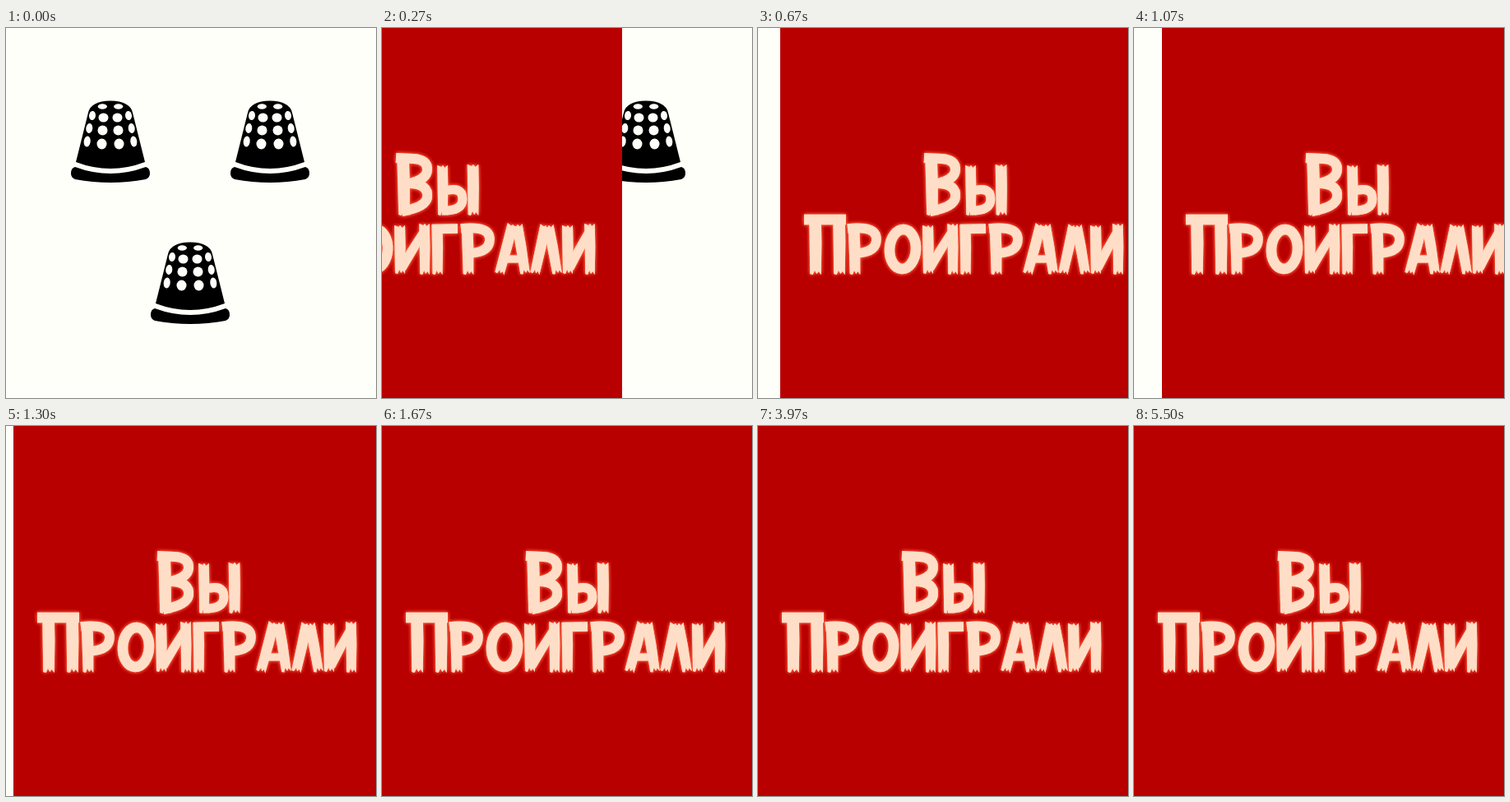
Write an HTML page with a canvas that moves like this. It is 450 by 450 pixels and loops after 6.01 s.

```html
<!DOCTYPE html>
<html lang="ru">
<head>
<meta charset="utf-8">
<title>Вы Проиграли</title>
<style>
html, body { margin: 0; width: 100%; height: 100%; overflow: hidden; background: #fffffa; }
canvas { display: block; width: 450px; height: 450px; }
</style>
</head>
<body>
<canvas id="stage" width="450" height="450" role="img" aria-label="Вы Проиграли"></canvas>
<script>
const SIZE = 450, LOOP = 6010, STEP = 100 / 3;
const PAPER = '#fffffa', RED = '#b90000', PEACH = '#ffdec8', GLOW = '#ff5a3a';
const ctx = document.getElementById('stage').getContext('2d');

function makeLayer(paint) {
  const layer = document.createElement('canvas');
  layer.width = layer.height = SIZE;
  paint(layer.getContext('2d'));
  return layer;
}

function drawThimble(c, x, y) {
  c.save();
  c.translate(x, y);
  c.fillStyle = '#000';
  c.fill(new Path2D('M85 163L100 103Q103 89 127 88.5Q151 89 154 103L169 163Q127 179 85 163Z'));
  c.fill(new Path2D('M84 169Q127 185 170 169Q175 170 175 177Q175 182 170 184Q127 192 84 184Q79 182 79 177Q79 170 84 169Z'));
  c.fillStyle = PAPER;
  // distance from the middle, height, radii; mirrored
  const dots = [
    [9.7, 95.5, 5.6, 3.2],
    [8.5, 109, 6, 5.6], [22, 106.5, 4, 5.6],
    [9.5, 124.5, 6, 6], [25.7, 122, 4, 6],
    [10.5, 141, 6, 6.4], [28.3, 138, 4, 6.6]
  ];
  for (const [dx, dy, rx, ry] of dots) {
    for (const side of [-1, 1]) {
      c.beginPath();
      c.ellipse(127 + side * dx, dy, rx, ry, side * (dx > 20 ? -0.12 : 0), 0, 7);
      c.fill();
    }
  }
  c.restore();
}

// A brush stroke with torn ends
function stem(c, x0, y0, x1, y1, w) {
  const len = Math.hypot(x1 - x0, y1 - y0), h = w / 2;
  c.save();
  c.translate(x0, y0);
  c.rotate(Math.atan2(y1 - y0, x1 - x0) - Math.PI / 2);
  c.beginPath();
  c.moveTo(-h - 1, -1);
  c.lineTo(-h * 0.3, 1);
  c.lineTo(0, -1);
  c.lineTo(h * 0.4, 2);
  c.lineTo(h, -1);
  c.lineTo(h + 0.6, len * 0.45);
  c.lineTo(h, len + 1);
  c.lineTo(h * 0.55, len - 3);
  c.lineTo(h * 0.2, len);
  c.lineTo(-h * 0.15, len - 4);
  c.lineTo(-h * 0.5, len + 1);
  c.lineTo(-h, len);
  c.closePath();
  c.fill();
  c.restore();
}

function curve(c, d, w) {
  c.lineWidth = w;
  c.stroke(new Path2D(d));
}

function letterR(c, x) {
  c.save();
  c.translate(x, 0);
  stem(c, 90, 240, 91, 299, 12.5);
  curve(c, 'M82 244Q117 240 117 257Q117 273 92 274', 11.5);
  c.restore();
}

function letterI(c, left, right) {
  stem(c, left + 2, 291, right - 2, 249, 10);
  stem(c, left, 241, left, 298, 12);
  stem(c, right, 239, right, 299, 11.5);
}

const letters = makeLayer(c => {
  c.fillStyle = c.strokeStyle = PEACH;
  c.lineJoin = 'round';
  // Вы
  stem(c, 184, 156, 185, 227, 13.5);
  curve(c, 'M175 158L196 159Q214 160 213 173Q212 184 192 189Q215 190 213 206Q211 218 182 223', 12);
  stem(c, 232, 168, 232, 227, 11.5);
  curve(c, 'M231 199Q256 191 256 208Q256 223 231 222', 11);
  stem(c, 269, 167, 269, 227, 12.5);
  // Проиграли
  stem(c, 43, 230, 43, 299, 13.5);
  stem(c, 72, 229, 72, 299, 13.5);
  curve(c, 'M29 233L80 233', 12.5);
  letterR(c, 0);
  c.lineWidth = 12.5;
  c.beginPath();
  c.ellipse(149, 269, 16, 24, 0.06, 0, 7);
  c.stroke();
  letterI(c, 180, 210);
  stem(c, 225.5, 240, 225.5, 299, 12);
  curve(c, 'M219 244.5L250 244', 11.5);
  letterR(c, 172);
  stem(c, 317, 240, 301, 298, 11.5);
  stem(c, 323, 240, 332, 298, 11.5);
  curve(c, 'M306 281L329 281', 9);
  stem(c, 357, 241, 344, 298, 11.5);
  stem(c, 361, 241, 371, 298, 11.5);
  letterI(c, 384, 411);
});

const title = makeLayer(c => {
  c.shadowColor = GLOW;
  c.shadowBlur = 4;
  c.drawImage(letters, 0, 0);
  c.drawImage(letters, 0, 0);
});

const table = makeLayer(c => {
  c.fillStyle = PAPER;
  c.fillRect(0, 0, SIZE, SIZE);
  drawThimble(c, 0, 0);
  drawThimble(c, 194, 0);
  drawThimble(c, 97, 172);
});

// step, panel position, speed per step
const slide = [
  [0, -450, 47], [8, -158, 26.6], [20, 27, 6],
  [32, 34, -3.1], [38, 12, -2.7], [50, 0, 0]
];

function panelX(n) {
  if (n >= 50) return 0;
  const i = slide.findIndex(k => k[0] > n);
  const [a, p, u] = slide[i - 1], [b, q, v] = slide[i];
  const d = b - a, s = (n - a) / d, r = 1 - s;
  return r * r * (1 + 2 * s) * p + s * r * r * d * u
       + s * s * (3 - 2 * s) * q - s * s * r * d * v;
}

function draw(now) {
  const n = Math.floor((now % LOOP + 4) / STEP);
  const x = Math.round(panelX(n));
  ctx.drawImage(table, 0, 0);
  ctx.fillStyle = RED;
  ctx.fillRect(x, 0, SIZE, SIZE);
  ctx.drawImage(title, x, 0);
}

const start = performance.now();
function tick() {
  draw(performance.now() - start);
  requestAnimationFrame(tick);
}
tick();
</script>
</body>
</html>
```
